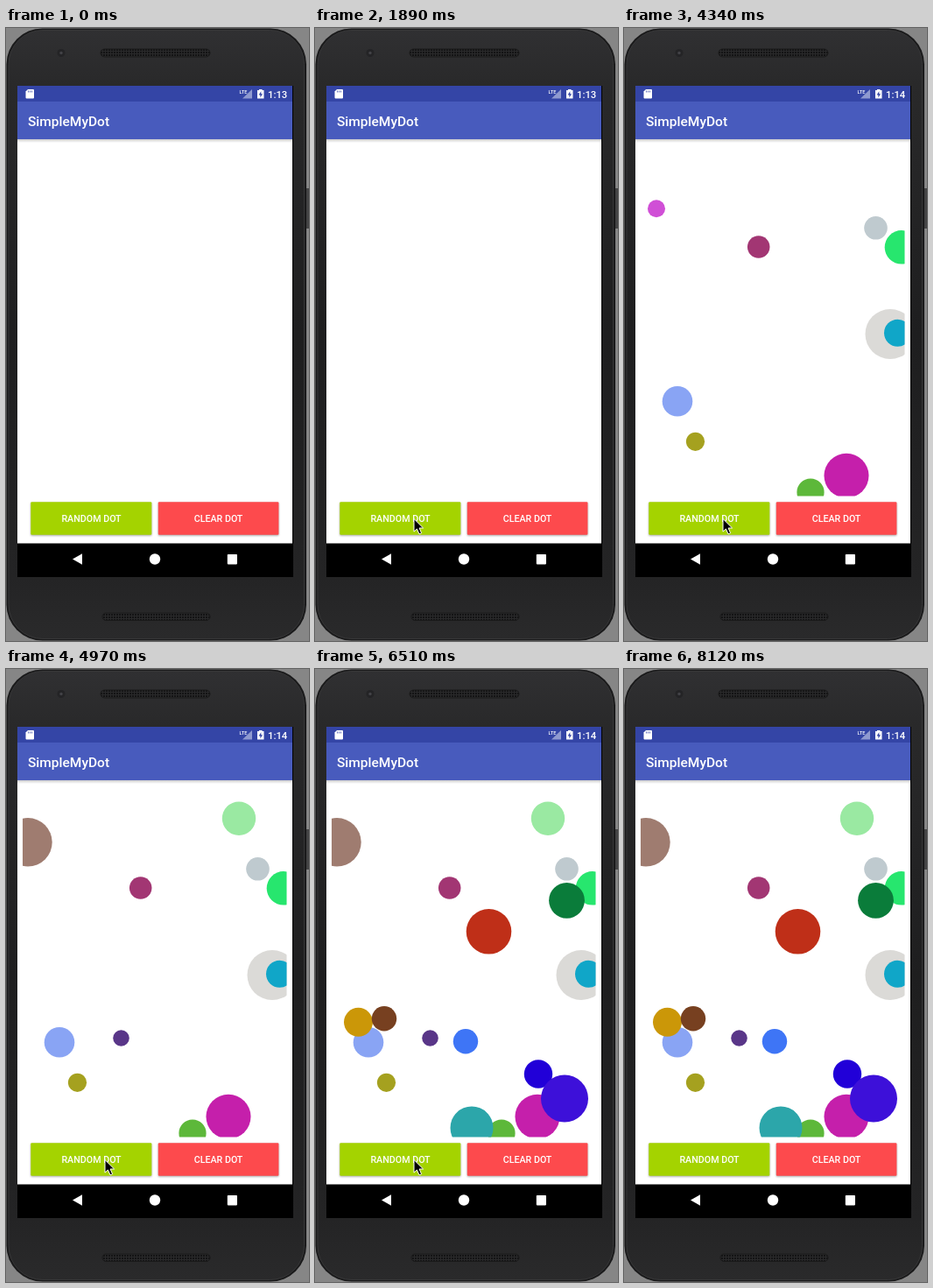
Recreate the animation shown at these times as an HTML page. Size 346 by 700 pixels, loop 8190 ms.

```html
<!DOCTYPE html>
<html lang="en">
<head>
<meta charset="utf-8">
<title>SimpleMyDot</title>
<style>
  html, body { margin: 0; width: 100%; height: 100%; overflow: hidden; background: #868686; }
  svg { display: block; width: 346px; height: 700px; }
  text { font-family: Roboto, "Noto Sans", sans-serif; font-weight: 500; fill: #fff; }
  .label { font-size: 10.7px; text-anchor: middle; }
  .button { filter: drop-shadow(0 1px 1px rgba(0, 0, 0, .35)); }
</style>
</head>
<body>
<svg viewBox="0 0 346 700">
  <defs>
    <linearGradient id="face" x2="0" y2="1">
      <stop offset="0" stop-color="#303032"/>
      <stop offset=".09" stop-color="#29292a"/>
      <stop offset=".5" stop-color="#1e1e1f"/>
      <stop offset=".9" stop-color="#242425"/>
      <stop offset="1" stop-color="#2a2a2b"/>
    </linearGradient>
    <linearGradient id="drop" x2="0" y2="1">
      <stop offset="0" stop-color="#000" stop-opacity=".2"/>
      <stop offset="1" stop-color="#000" stop-opacity="0"/>
    </linearGradient>
    <pattern id="mesh" width="3" height="3" patternUnits="userSpaceOnUse">
      <rect width="3" height="3" fill="#29292a"/>
      <circle cx="1" cy="1" r="1" fill="#0d0d0d"/>
    </pattern>
    <clipPath id="area"><rect x="19" y="133" width="301.5" height="401.5"/></clipPath>
  </defs>

  <!-- phone -->
  <rect width="346" height="700" fill="#868686"/>
  <rect x="342" y="183" width="4" height="46" fill="#444445"/>
  <rect x=".5" y=".5" width="342.500" height="699" rx="41" fill="#1a1a1b"/>
  <rect x="3" y="2.500" width="337.500" height="695" rx="39" fill="url(#face)" stroke="#373738"/>
  <circle cx="63" cy="28.500" r="4.500" fill="#242426"/>
  <circle cx="63" cy="28.500" r="1.700" fill="#434347"/>
  <rect x="108" y="24" width="125" height="9" rx="4.500" fill="url(#mesh)" stroke="#1a1a1a"/>
  <rect x="110" y="668" width="123" height="8.500" rx="4.200" fill="url(#mesh)" stroke="#1a1a1a"/>

  <!-- screen -->
  <rect x="13" y="66" width="315" height="561" fill="#000"/>
  <rect x="13" y="66" width="314" height="523" fill="#fff"/>
  <rect x="13" y="66" width="314" height="18.500" fill="#3445a6"/>
  <rect x="13" y="84" width="314" height="43" fill="#485bbd"/>
  <rect x="13" y="127" width="314" height="4" fill="url(#drop)"/>
  <text x="25" y="112" font-size="15.500">SimpleMyDot</text>

  <!-- status bar -->
  <path d="M25 70H31Q32 70 32 71V79.500Q32 80.500 31 80.500H23.500Q22.500 80.500 22.500 79.500V72.500Z" fill="#fff"/>
  <path d="M25.500 71.500V73.500M27.500 71.500V73.500M29.500 71.500V73.500" stroke="#3445a6" stroke-width=".8"/>
  <path d="M281 70V80.500H270Z" fill="#8f9ad0"/>
  <text x="266.500" y="75" font-size="5.500">LTE</text>
  <path d="M289 70H292.500V71H294.500V80.500H287V71H289Z" fill="#fff"/>
  <path d="M291.300 72.300L288.600 76.600H290.400V79.400L293 75.200H291.300Z" fill="#3445a6"/>
  <text id="clock" x="321.300" y="80" font-size="11.300" text-anchor="end">1:13</text>

  <g id="dots" clip-path="url(#area)"></g>

  <!-- buttons -->
  <rect class="button" x="28.300" y="541.300" width="138" height="37.400" rx="1" fill="#a4d300"/>
  <rect class="button" x="173.800" y="541.300" width="137.600" height="37.400" rx="1" fill="#fd4a4d"/>
  <text class="label" x="97.500" y="564">RANDOM DOT</text>
  <text class="label" x="242.500" y="564">CLEAR DOT</text>

  <!-- navigation bar -->
  <rect x="13" y="588.500" width="315" height="38.500" fill="#000"/>
  <path d="M76 606.500L87 600.200V612.800Z" fill="#fff"/>
  <circle cx="170" cy="606.500" r="6.200" fill="#fff"/>
  <rect x="252.800" y="601" width="11.200" height="11.400" rx=".8" fill="#fff"/>

  <g id="ring" fill="none">
    <circle cx="113" cy="561.500" r="21.500" stroke="#fff" stroke-opacity=".5" stroke-width="3"/>
    <circle cx="113" cy="561.500" r="21.500" stroke="#111" stroke-width="1.500"/>
  </g>
  <path id="cursor" d="M0 0V14.600L3.400 11.500L6 17.300L8.600 16.200L6.100 10.500H10.600Z"
        fill="#000" stroke="#fff" stroke-width="1" stroke-linejoin="round"/>
</svg>
<script>
const LOOP = 8190, PRESS = 105, MINUTE = 3850;

// time shown, x, y, radius, colour
const dots = [
  [2660, 81.5, 472.3, 10.6, '#a5a11f'],
  [2870, 287.5, 228.3, 13.3, '#bfcacf'],
  [3080, 304, 349.5, 28.5, '#dbdad7'],
  [3290, 317, 250.3, 19.3, '#27e66e'],
  [3430, 61, 426.3, 17.3, '#89a4f4'],
  [3640, 153.7, 250, 12.8, '#a23673'],
  [3850, 312.5, 348.3, 15.5, '#10a6c8'],
  [3990, 213, 530, 15.6, '#5db83a'],
  [4130, 37, 206.3, 10, '#d04fd6'],
  [4270, 254, 511.3, 25.5, '#c51fab'],
  [4480, 266, 170.7, 19.2, '#9ae9a2'],
  [4690, 131.5, 421.5, 9.3, '#593688'],
  [4900, 25, 197.8, 27.7, '#9f7c70'],
  [5110, 255, 462.5, 16.2, '#2100d8'],
  [5320, 49.5, 403.3, 16.5, '#cb9708'],
  [5530, 179, 524, 24.5, '#2ca6aa'],
  [5740, 79, 399.3, 14.2, '#774020'],
  [5880, 198.5, 299.8, 25.8, '#bf2f18'],
  [6090, 172, 425.3, 14.2, '#3e75f6'],
  [6230, 287.5, 264.3, 20.4, '#0a7c3a'],
  [6440, 285, 490.5, 27, '#3d10d9']
];

// time, x, y of the pointer tip
const path = [[350, 347, 642], [910, 113, 560.5], [6550, 113, 560.5], [6860, 347, 702]];

const get = id => document.getElementById(id);
const [clock, ring, cursor, layer] = ['clock', 'ring', 'cursor', 'dots'].map(get);
const show = (el, on) => el.setAttribute('visibility', on ? 'visible' : 'hidden');
const ease = p => p * p * (3 - 2 * p);

const circles = dots.map(([, cx, cy, r, fill]) => {
  const el = document.createElementNS('http://www.w3.org/2000/svg', 'circle');
  for (const [key, value] of Object.entries({ cx, cy, r, fill })) el.setAttribute(key, value);
  return layer.appendChild(el);
});

function movePointer(t) {
  const i = path.findIndex((p, k) => k && t < p[0]);
  const on = i > 0 && t >= path[0][0];
  show(cursor, on);
  if (!on) return;
  const [t0, x0, y0] = path[i - 1], [t1, x1, y1] = path[i];
  const p = ease((t - t0) / (t1 - t0));
  cursor.setAttribute('transform', `translate(${x0 + (x1 - x0) * p} ${y0 + (y1 - y0) * p})`);
}

function draw(t) {
  circles.forEach((el, i) => show(el, t >= dots[i][0]));
  show(ring, dots.some(([at]) => t >= at - PRESS && t < at));
  clock.textContent = t < MINUTE ? '1:13' : '1:14';
  movePointer(t);
}

const start = performance.now();
function tick() {
  draw((performance.now() - start) % LOOP);
  requestAnimationFrame(tick);
}
draw(0);
requestAnimationFrame(tick);
</script>
</body>
</html>
```
